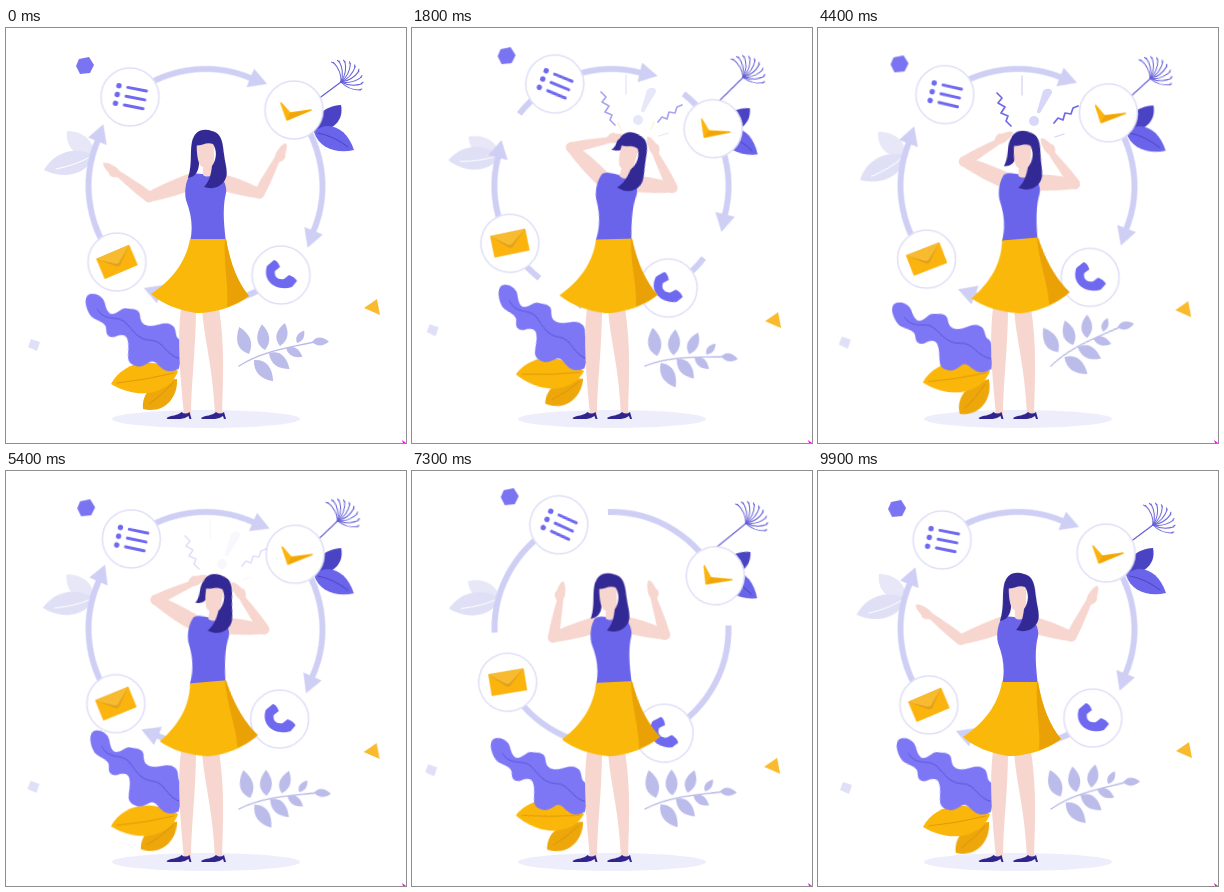
These frames come from a looping animation (400x415 px, 10000 ms). An HTML page without scripts:

```html
<!DOCTYPE html>
<html lang="en">
<head>
<meta charset="utf-8">
<title>Multitasking</title>
<style>
html, body { margin: 0; width: 100%; height: 100%; overflow: hidden; background: #fff; }
svg { display: block; width: 100vw; height: 100vh; }

/* gentle back and forth */
.swing { animation: swing 2.5s cubic-bezier(.37,0,.63,1) infinite alternate; }
@keyframes swing {
  from { transform: translate(0,0) rotate(0deg); }
  to { transform: translate(var(--x,0px),var(--y,0px)) rotate(var(--r,0deg)); }
}
.dandelion { --r: -8deg; transform-origin: 300px 80px; animation-duration: 1.6667s; }
.skirt { transform-origin: 201px 211px; animation: skirt 5s cubic-bezier(.37,0,.63,1) infinite alternate; }
@keyframes skirt {
  from { transform: rotate(0deg) skewX(0deg); }
  to { transform: rotate(-5deg) skewX(4deg); }
}

/* plants */
.sway { animation: sway 5s infinite; }
@keyframes sway {
  0%, 100% { transform: rotate(0deg); animation-timing-function: cubic-bezier(.33,.5,.65,1); }
  26% { transform: rotate(calc(var(--k) * 13deg)); animation-timing-function: cubic-bezier(.4,0,.6,1); }
  80% { transform: rotate(calc(var(--k) * -14deg)); animation-timing-function: cubic-bezier(.5,0,.7,.6); }
}
.wave { transform-origin: 175px 335px; animation: wave 5s infinite; }
@keyframes wave {
  0%, 100% { transform: rotate(0deg); animation-timing-function: cubic-bezier(.33,.5,.65,1); }
  25% { transform: rotate(9deg); animation-timing-function: cubic-bezier(.4,0,.6,1); }
  67% { transform: rotate(-10.5deg); animation-timing-function: cubic-bezier(.4,0,.7,.6); }
}

.spin { animation: spin 5s cubic-bezier(.56,0,.1,1) infinite; }
@keyframes spin { to { transform: rotate(180deg); } }

/* body poses: open, raised, near head, on head, furthest */
.pose { animation: pose 10s infinite; }
@keyframes pose {
  0%, 100% { transform: var(--open); animation-timing-function: cubic-bezier(.45,0,.7,.7); }
  33.33%, 66.67% { transform: var(--up); animation-timing-function: cubic-bezier(.45,0,.7,.7); }
  10.67%, 22.67%, 44%, 56%, 77.33%, 89.33% { transform: var(--near); animation-timing-function: cubic-bezier(.3,.3,.55,1); }
  50%, 83.33% { transform: var(--on); animation-timing-function: cubic-bezier(.45,0,.7,.7); }
  16.67% { transform: var(--far); animation-timing-function: cubic-bezier(.45,0,.7,.7); }
}
.torso { transform-origin: 201px 211px;
  --open: rotate(0deg); --up: rotate(-3deg); --near: rotate(2deg); --on: rotate(5deg); --far: rotate(6deg); }
.head { transform-origin: 201px 148px;
  --open: translate(0,0) rotate(0deg); --up: translate(-5px,0) rotate(-1deg); --near: translate(1px,1px) rotate(2deg);
  --on: translate(2px,1px) rotate(8deg); --far: translate(4px,1px) rotate(11deg); }
.strand { transform-origin: 188px 112px;
  --open: scaleY(1); --up: scaleY(1.1); --near: scaleY(.7); --on: scaleY(.4); --far: scaleY(.3); }
.armL { --open: rotate(159.6deg); --up: rotate(134deg); --near: rotate(202.4deg); --on: rotate(213deg); --far: rotate(220deg); }
.foreL { --open: rotate(57.4deg); --up: rotate(110.6deg); --near: rotate(125deg); --on: rotate(124.6deg); --far: rotate(124deg); }
.armR { --open: rotate(16.7deg); --up: rotate(27deg); --near: rotate(0deg); --on: rotate(3deg); --far: rotate(0deg); }
.foreR { --open: rotate(-79deg); --up: rotate(-115deg); --near: rotate(-129deg); --on: rotate(-130deg); --far: rotate(-121.5deg); }

/* stress marks */
.shift { animation: shift 10s step-end infinite; }
@keyframes shift { 0% { transform: translate(10px,-1px); } 33.33%, 100% { transform: none; } }
.marks { animation: marks 3.3333s linear infinite; }
@keyframes marks { 0%, 20% { opacity: 0; } 27%, 34% { opacity: 1; } 46% { opacity: .85; } 54% { opacity: .6; } 66%, 100% { opacity: 0; } }
.sparks { opacity: 0; animation: sparks 3.3333s linear infinite; }
@keyframes sparks { 0% { opacity: 0; } 4%, 8% { opacity: 1; } 15%, 100% { opacity: 0; } }
.glints { animation: glints 3.3333s linear infinite; }
@keyframes glints { 0%, 40% { opacity: 0; } 45%, 48% { opacity: 1; } 56%, 100% { opacity: 0; } }
</style>
</head>
<body>
<svg viewBox="0 0 400 415" fill="none" stroke-linecap="round" stroke-linejoin="round">
  <defs>
    <g id="arrow">
      <circle r="117" pathLength="360" stroke="#cfcff5" stroke-width="6" stroke-linecap="butt" stroke-dasharray="67 293"/>
      <path d="M-10 0H10L1 18Z" fill="#cfcff5" transform="rotate(66) translate(117)"/>
    </g>
    <circle id="disc" r="29" fill="#fff" stroke="#e0e0f7" stroke-width="1.6"/>
    <path id="leaf" d="M0 0C-9 -7 -8 -16 0 -26C7 -17 8 -8 0 0Z"/>
    <path id="ray" d="M0 0C3 -6 4 -13 1 -21M-.5 -22L1 -20"/>
    <path id="upper" d="M0 -8C16 -9 32 -7 46 -5A5 5 0 0 1 46 5C32 7 16 8 0 8Z"/>
    <path id="fore" d="M0 -5.3C14 -5.3 26 -4 37 -3C41 -7 45 -7 46 -5C50 -4 56 -3 57 0C54 3 46 5 39 3.2C26 4 14 5.500 0 5.300A5.300 5.300 0 0 1 0 -5.300Z"/>
    <g id="row">
      <circle cx="-13" r="2.7" fill="#6f69f0"/>
      <path d="M-4 0H15" stroke="#6f69f0" stroke-width="3"/>
    </g>
    <path id="shoe" d="M0 6C5 3 11 4 15 0Q19 3 23 0L25 7H23L22 4Q18 7 14 7H1Z" fill="#30258f"/>
  </defs>

  <rect width="400" height="415" fill="#fff"/>
  <path d="M396 412L400 415H397Z" fill="#f0f"/>
  <ellipse cx="200" cy="391" rx="94" ry="9" fill="#ededfb"/>

  <!-- floating shapes -->
  <g class="swing" style="--x:19px;--y:-12px">
    <path d="M73 31L83 29L88 37L84 45L74 46L70 38Z" fill="#7a74f2"/>
  </g>
  <g class="swing" style="--x:-9px;--y:-18px">
    <path d="M25 311L34 314L31 323L22 319Z" fill="#dfe0f8"/>
  </g>
  <g class="swing" style="--x:-6px;--y:16px">
    <path d="M358 280L371 271L374 287Z" fill="#f9bb2d"/>
  </g>

  <!-- side leaves -->
  <g class="swing" style="--r:-14deg;transform-origin:88px 128px">
    <path d="M61 103C78 103 89 114 88 129C70 130 59 119 61 103Z" fill="#e7e7f8"/>
  </g>
  <g class="sway" style="--k:1;transform-origin:88px 128px">
    <path d="M38 142C48 124 70 117 89 128C80 147 58 152 38 142Z" fill="#dfe0f5"/>
    <path d="M50 141Q70 137 84 129" stroke="#fff"/>
  </g>
  <g class="swing" style="--r:8deg;transform-origin:308px 104px">
    <path d="M308 104C308 88 318 78 335 77C338 92 328 103 308 104Z" fill="#4a43c4"/>
    <path d="M308 104C322 91 341 100 348 122C330 126 313 120 308 104Z" fill="#6a64ea"/>
    <path d="M312 105Q328 108 342 119" stroke="#4a43c4"/>
  </g>
  <g class="swing dandelion" stroke="#645ed6">
    <path d="M300 80L335 54" stroke-width="1.2"/>
    <g transform="translate(335 54)">
      <use href="#ray" transform="rotate(-24)"/>
      <use href="#ray" transform="rotate(-8)"/>
      <use href="#ray" transform="rotate(8)"/>
      <use href="#ray" transform="rotate(24)"/>
      <use href="#ray" transform="rotate(40)"/>
      <use href="#ray" transform="rotate(56)"/>
      <use href="#ray" transform="rotate(74)"/>
      <use href="#ray" transform="rotate(92)"/>
      <use href="#ray" transform="rotate(110)"/>
    </g>
  </g>

  <!-- twig -->
  <g class="sway" style="--k:1;transform-origin:233px 338px">
    <path d="M233 338C258 322 288 319 312 313" stroke="#b9b9ea" stroke-width="1.4"/>
    <g fill="#bcbcea">
      <use href="#leaf" transform="translate(243 326) rotate(-20) scale(1.1)"/>
      <use href="#leaf" transform="translate(259 322) rotate(-7)"/>
      <use href="#leaf" transform="translate(274 318) rotate(12) scale(.9)"/>
      <use href="#leaf" transform="translate(291 315) rotate(30) scale(.55)"/>
      <use href="#leaf" transform="translate(306 314) rotate(88) scale(.65)"/>
      <use href="#leaf" transform="translate(248 332) rotate(138) scale(1.1)"/>
      <use href="#leaf" transform="translate(263 325) rotate(128)"/>
      <use href="#leaf" transform="translate(280 320) rotate(118) scale(.72)"/>
    </g>
  </g>

  <!-- arrows and icons -->
  <g transform="translate(199.5 158)">
    <g class="spin">
      <g transform="rotate(-133.5)">
        <use href="#arrow"/>
        <use href="#arrow" transform="rotate(90)"/>
        <use href="#arrow" transform="rotate(180)"/>
        <use href="#arrow" transform="rotate(270)"/>
      </g>
    </g>
    <g class="swing" style="--r:13.7deg">
      <g transform="translate(-75.5 -89)">
        <use href="#disc"/>
        <g transform="rotate(11)">
          <use href="#row" y="-9"/>
          <use href="#row"/>
          <use href="#row" y="9"/>
        </g>
      </g>
      <g transform="translate(88.5 -76)">
        <use href="#disc"/>
        <path d="M-13 -7L-4 3L17 0L-7 10Z" fill="#fbb40e" stroke="#fbb40e" stroke-width="1.6"/>
        <path d="M-4 3L17 0L-7 10Z" fill="#f0a50a"/>
      </g>
      <g transform="translate(75.5 89)">
        <use href="#disc"/>
        <path d="M-14 -9L-7 -15Q-3 -14 -1 -8L-6 -4C-7 2 -3 5 3 4L8 0Q14 2 16 6L11 12C-5 17 -19 6 -14 -9Z" fill="#6f69f0"/>
      </g>
      <g transform="translate(-88.5 76)">
        <use href="#disc"/>
        <g transform="rotate(-23)">
          <rect x="-18" y="-11" width="36" height="22" rx="1" fill="#fbb40e"/>
          <path d="M-18 -11H18L2 4Q0 5 -2 4Z" fill="#e0a11c"/>
          <path d="M-18 -11H18L2 1Q0 2 -2 1Z" fill="#f8bb30"/>
        </g>
      </g>
    </g>
  </g>

  <!-- bottom left leaves -->
  <g class="sway" style="--k:.75;transform-origin:172px 352px">
    <path d="M137 381C135 364 150 351 171 351C172 370 158 386 137 381Z" fill="#eda70b"/>
    <path d="M143 376Q156 367 167 355" stroke="#d8930a"/>
  </g>
  <g class="swing" style="--r:10deg;transform-origin:172px 343px">
    <path d="M105 356C115 338 138 326 172 343C165 364 135 374 105 356Z" fill="#fbb60a"/>
    <path d="M111 355Q140 352 168 345" stroke="#dd9a0a"/>
  </g>
  <g class="wave">
    <g transform="rotate(10.3 175 335)">
      <path d="M71 285C76 280 86 283 89 289C92 296 95 300 99 299C104 298 106 291 112 291C120 290 124 290 126 295C128 303 132 305 138 304C146 303 150 297 158 299C166 301 163 310 169 312C174 316 172 324 174 333V341C169 345 164 347 158 344C152 341 149 337 145 339C140 343 137 347 131 346C122 345 122 340 121 333C120 324 118 318 113 318C107 318 107 322 101 322C94 321 97 314 93 311C88 307 81 309 76 303C72 298 68 291 71 285Z" fill="#7d77f5"/>
      <path d="M83 297C93 309 104 299 113 305S128 320 141 318S158 330 173 331" stroke="#5c55dd"/>
    </g>
  </g>

  <!-- woman -->
  <g fill="#f6d6cf">
    <path d="M175 280C171 312 174 345 178 387H185C185 355 190 320 190 280Z"/>
    <path d="M196 280C198 312 207 338 209 387H216C217 350 219 320 213 280Z"/>
  </g>
  <use href="#shoe" x="160.500" y="384"/>
  <use href="#shoe" x="195" y="384"/>

  <g class="torso pose">
    <g fill="#f6d6cf">
      <g transform="translate(186 153)">
        <g class="armL pose">
          <use href="#upper"/>
          <g transform="translate(46)"><g class="foreL pose"><use href="#fore"/></g></g>
        </g>
      </g>
      <g transform="translate(215 154)">
        <g class="armR pose">
          <use href="#upper" transform="scale(.86 1)"/>
          <g transform="translate(40)"><g class="foreR pose"><use href="#fore" transform="scale(1 -1)"/></g></g>
        </g>
      </g>
    </g>
    <path d="M184 147C190 144 195 146 202 147C208 146 213 146 216 149C219 155 221 160 220 165C217 177 217 190 220 214H184C187 200 186 188 180 172C178 164 180 152 184 147Z" fill="#6a64ea"/>
    <g class="head pose">
      <g class="strand pose">
        <path d="M187 110C183 122 187 134 182 150C190 149 194 142 193 130L192 114Z" fill="#332994"/>
      </g>
      <path d="M191 112H208L208 135L206 147Q201 150 197 147L197 139C192 139 190 124 191 112Z" fill="#f6d6cf"/>
      <path d="M187 117C185 104 196 99 206 103C216 105 217 116 218 126C219 136 223 145 219 152C215 159 207 162 198 159C204 152 205 146 206 138C211 131 211 122 207 116C200 113 195 119 187 117Z" fill="#332994"/>
      <g class="sparks" stroke="#f8cf6a" stroke-width="1.5">
        <path d="M187 95L192 100M200 86L202 93M217 86L214 93M226 99L232 95M229 114L235 116"/>
      </g>
    </g>
  </g>

  <g class="skirt">
    <path d="M184 211H220C224 235 232 255 243 268C232 277 212 285 190 285C172 282 156 276 145 266C166 252 180 234 184 211Z" fill="#fab90a"/>
    <path d="M219 211H220C224 235 232 255 243 268Q233 275 221 279C223 258 217 235 219 211Z" fill="#e9a106"/>
  </g>

  <g class="shift">
    <g class="marks">
      <path d="M179 65L184 70L180 75L187 79L183 85L190 88L188 93L193 98M236 95L240 90L245 92L247 85L253 86L255 80L260 78" stroke="#706aeb" stroke-width="1.7"/>
      <path d="M204 48V67M237 109L246 106" stroke="#d5d4f5" stroke-width="1.3"/>
      <path d="M225 63C229 59 235 61 234 65L222 85C219 86 219 84 219 83Z" fill="#d8d7f8"/>
      <circle cx="216" cy="93" r="5" fill="#d8d7f8"/>
    </g>
    <path class="glints" d="M196 96L199 103M232 95L229 102" stroke="#f8cf6a" stroke-width="1.6"/>
  </g>
</svg>
</body>
</html>
```
